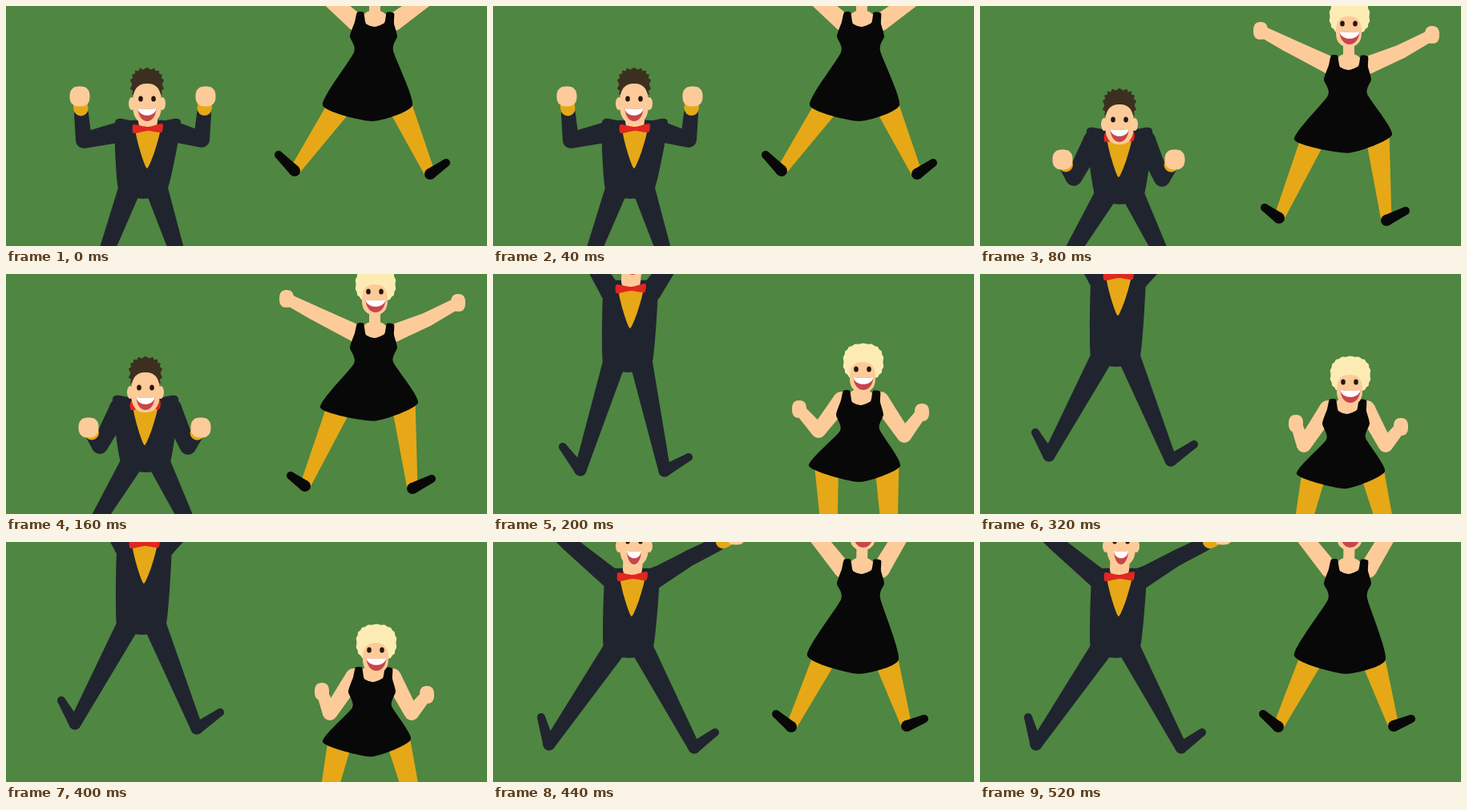
These frames come from a looping animation (600 by 300 pixels, 560 ms). An HTML page with a canvas:

```html
<!DOCTYPE html>
<html lang="en">
<head>
<meta charset="utf-8">
<title>Jumping couple</title>
<style>
  html, body { margin: 0; height: 100%; overflow: hidden; background: #4f8641; }
  canvas { display: block; width: 100%; height: 100%; }
</style>
</head>
<body>
<canvas id="stage" width="600" height="300"></canvas>
<script>
const ctx = document.getElementById('stage').getContext('2d');
const GREEN = '#4f8641', NAVY = '#20242f', SKIN = '#fdcb99', GOLD = '#e6a817', BLACK = '#080808',
      RED = '#e0281f', LIPS = '#c8454a', BLONDE = '#fcecb4', BROWN = '#3c2f20', DARK = '#241810';
const SIDES = [-1, 1];

const mix = (a, b, t) => [a[0] + (b[0] - a[0]) * t, a[1] + (b[1] - a[1]) * t];

// Closed outline through points given relative to an origin, corners slightly rounded.
function shape(color, [x, y], points) {
  const p = points.map(([px, py]) => [px + x, py + y]);
  const at = i => p[(i + p.length) % p.length];
  const handle = (i, k) => [at(i)[0] + (at(i + 1)[0] - at(i - 1)[0]) * k, at(i)[1] + (at(i + 1)[1] - at(i - 1)[1]) * k];
  ctx.fillStyle = color;
  ctx.beginPath();
  ctx.moveTo(...p[0]);
  p.forEach((_, i) => ctx.bezierCurveTo(...handle(i, 0.1), ...handle(i + 1, -0.1), ...at(i + 1)));
  ctx.fill();
}

function oval(color, [x, y], rx, ry) {
  ctx.fillStyle = color;
  ctx.beginPath();
  ctx.ellipse(x, y, rx, ry, 0, 0, 7);
  ctx.fill();
}

// Squarish oval; ripple gives it a tufted edge.
function blob(color, center, rx, ry, ripple = 0) {
  const soft = v => Math.sign(v) * Math.abs(v) ** 0.8;
  shape(color, center, Array.from({ length: 36 }, (_, i) => {
    const a = i / 36 * 2 * Math.PI, r = 1 + ripple * (i % 2 ? 1 : -1);
    return [rx * r * soft(Math.cos(a)), ry * r * soft(Math.sin(a))];
  }));
}

// Tapering limb with round joints.
function limb(color, radii, ...joints) {
  joints.forEach((a, i) => {
    oval(color, a, radii[i], radii[i]);
    const b = joints[i + 1];
    if (!b) return;
    const angle = Math.atan2(b[1] - a[1], b[0] - a[0]);
    const nx = -Math.sin(angle), ny = Math.cos(angle), r = radii[i], q = radii[i + 1];
    ctx.beginPath();
    ctx.moveTo(a[0] + nx * r, a[1] + ny * r);
    ctx.lineTo(b[0] + nx * q, b[1] + ny * q);
    ctx.lineTo(b[0] - nx * q, b[1] - ny * q);
    ctx.lineTo(a[0] - nx * r, a[1] - ny * r);
    ctx.fill();
  });
}

function smile([x, y], w, h) {
  for (const [color, depth] of [[LIPS, h], ['#fff', h * 0.55]]) {
    ctx.fillStyle = color;
    ctx.beginPath();
    ctx.moveTo(x - w / 2, y);
    ctx.quadraticCurveTo(x, y + 2, x + w / 2, y);
    ctx.bezierCurveTo(x + w * 0.45, y + depth * 1.33, x - w * 0.45, y + depth * 1.33, x - w / 2, y);
    ctx.fill();
  }
}

function eyes([x, y]) {
  for (const s of SIDES) oval(DARK, [x + s * 8, y], 2.8, 3.6);
}

function man({ neck, width, hip, head, mouth = [23, 16], arms, legs }) {
  const [nx, ny] = neck, [hx, hy] = hip, [x, y] = head;
  SIDES.forEach((s, i) => {
    const [ankle, toe] = legs[i], [elbow, hand] = arms[i];
    limb(NAVY, [14, 7.5], [hx + s * 17, hy - 11], ankle);
    limb(NAVY, [7.5, 5], ankle, toe);
    limb(NAVY, [13, 10, 9], [nx + s * (width - 9), ny + 4], elbow, mix(hand, elbow, 0.4));
    limb(GOLD, [9, 9], mix(hand, elbow, 0.2), mix(hand, elbow, 0.28));
    blob(SKIN, hand, 12.5, 12.5);
  });
  shape(NAVY, [0, 0], [
    [nx - width, ny - 8], [nx - 20, ny - 10], [nx + 20, ny - 10], [nx + width, ny - 8],
    [hx + 31, hy - 12], [hx + 8, hy], [hx - 8, hy], [hx - 31, hy - 12]]);
  shape(GOLD, neck, [[-15, -2], [15, -2], [9, 27], [-1, 50], [-10, 27]]);
  limb(SKIN, [13, 12], head, [nx, ny - 9]);
  shape(RED, neck, [[-18, -5], [0, -2], [18, -6], [17, 5], [0, 3], [-18, 6]]);
  blob(BROWN, [x, y - 18], 20, 20, 0.06);
  for (const s of SIDES) oval(SKIN, [x + s * 19, y + 6], 4, 8);
  blob(SKIN, [x, y + 6], 18, 25);
  eyes(head);
  smile([x, y + 12], ...mouth);
}

function woman({ neck, hem, head, arms, legs }) {
  const [nx, ny] = neck, [x, y] = head;
  SIDES.forEach((s, i) => {
    const [ankle, toe] = legs[i], [elbow, hand] = arms[i];
    limb(GOLD, [15, 6.5], mix(hem[i], [nx, hem[i][1]], 0.34), ankle);
    limb(BLACK, [7, 5], ankle, toe);
    limb(SKIN, [11, 9, 7], [nx + s * 24, ny + 12], elbow, hand);
    blob(SKIN, hand, 9, 11);
  });
  limb(SKIN, [7, 7], head, [nx, ny + 8]);
  oval(SKIN, [nx, ny + 9], 16, 12);
  const bottom = mix(hem[0], hem[1], 0.55);
  const local = ([px, py]) => [px - nx, py - ny];
  shape(BLACK, neck, [
    [-22, 0], [-14, 0], [-11, 14], [0, 18], [12, 13], [15, 0], [24, 1], [24, 14], [28, 30], [23, 48],
    local(hem[1]), local([bottom[0], bottom[1] + 20]), local(hem[0]), [-26, 50], [-31, 30], [-25, 12]]);
  blob(BLONDE, [x + 1, y - 9], 25, 23, 0.02);
  blob(SKIN, [x, y + 10], 16, 19);
  eyes(head);
  smile([x + 1, y + 10], 25, 16);
}

// Arms are [elbow, hand] and legs [ankle, toe], left then right.
const men = [
  { neck: [177, 153], width: 41, hip: [171, 240], head: [176, 116],
    arms: [[[97, 168], [92, 113]], [[244, 167], [249, 113]]],
    legs: [[[113, 340], [95, 340]], [[224, 340], [240, 340]]] },
  { neck: [174, 164], width: 41, hip: [174, 247], head: [174, 142],
    arms: [[[117, 215], [103, 192]], [[227, 216], [243, 192]]],
    legs: [[[95, 340], [80, 340]], [[241, 340], [255, 340]]] },
  { neck: [172, 18], width: 34, hip: [168, 122], head: [174, -27],
    arms: [[[122, -18], [110, -60]], [[226, -20], [240, -60]]],
    legs: [[[109, 245], [87, 216]], [[214, 246], [244, 229]]] },
  { neck: [173, 2], width: 34, hip: [169, 115], head: [174, -43],
    arms: [[[133, -15], [115, -60]], [[224, -18], [240, -60]]],
    legs: [[[86, 227], [69, 198]], [[238, 233], [267, 213]]] },
  { neck: [174, 43], width: 34, hip: [169, 144], head: [176, -1], mouth: [18, 17],
    arms: [[[95, 2], [50, -40]], [[245, 20], [303, -9]]],
    legs: [[[70, 253], [60, 219]], [[251, 257], [277, 238]]] }
];

const women = [
  { neck: [460, 8], hem: [[395, 124], [507, 124]], head: [460, -45],
    arms: [[[380, -30], [350, -60]], [[537, -18], [570, -50]]],
    legs: [[[360, 206], [340, 186]], [[529, 210], [549, 196]]] },
  { neck: [460, 62], hem: [[392, 167], [514, 161]], head: [460, 22],
    arms: [[[383, 48], [350, 31]], [[525, 57], [564, 36]]],
    legs: [[[373, 265], [355, 252]], [[507, 268], [531, 256]]] },
  { neck: [459, 146], hem: [[394, 240], [508, 240]], head: [461, 119],
    arms: [[[406, 196], [382, 169]], [[513, 202], [535, 173]]],
    legs: [[[422, 380], [405, 385]], [[497, 380], [515, 385]]] },
  { neck: [458, 157], hem: [[395, 250], [505, 247]], head: [461, 135],
    arms: [[[404, 214], [394, 187]], [[506, 214], [525, 191]]],
    legs: [[[390, 370], [375, 375]], [[520, 370], [535, 375]]] },
  { neck: [460, 22], hem: [[392, 142], [506, 147]], head: [461, -19],
    arms: [[[385, -30], [360, -70]], [[525, -35], [545, -70]]],
    legs: [[[372, 231], [353, 215]], [[516, 230], [538, 221]]] }
];

// The first pose is held for 80 ms, the other four for 120 ms each.
function draw() {
  const t = performance.now() % 560;
  const pose = t < 80 ? 0 : 1 + Math.floor((t - 80) / 120);
  ctx.fillStyle = GREEN;
  ctx.fillRect(0, 0, 600, 300);
  man(men[pose]);
  woman(women[pose]);
  requestAnimationFrame(draw);
}
draw();
</script>
</body>
</html>
```
